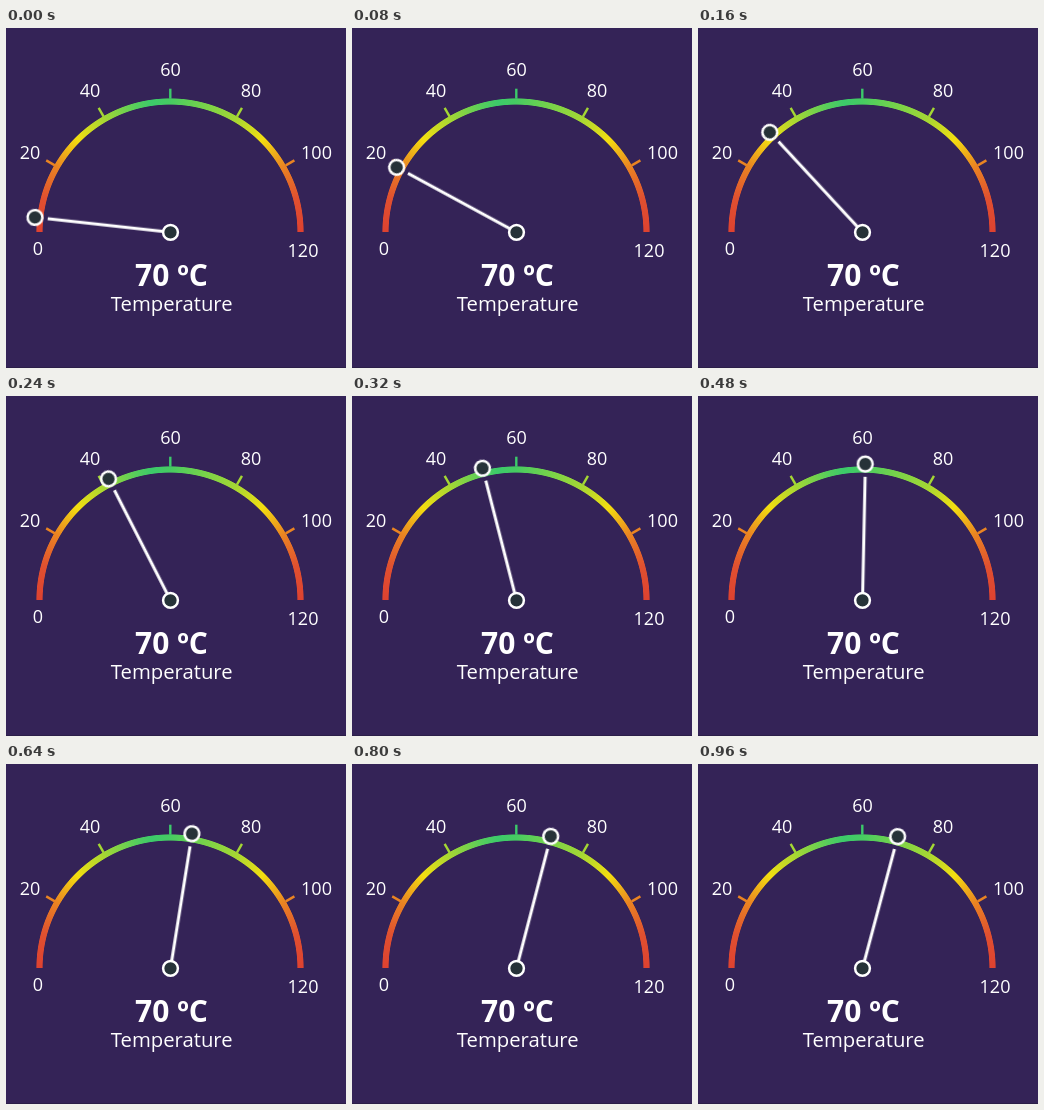
An HTML page for the animation above (8000 ms loop, 340 px wide and 340 px high).

```html
<!DOCTYPE html>
<html lang="en">
<head>
<meta charset="utf-8">
<title>Temperature gauge</title>
<style>
html, body { margin: 0; width: 100%; height: 100%; overflow: hidden; background: #342357; }
.gauge { position: absolute; left: 0; top: 0; width: 340px; height: 340px; overflow: hidden; }
.arc {
  position: absolute; left: 24px; top: 64px; width: 280px; height: 140px;
  --ring: radial-gradient(circle at 140px 140px, transparent 127px, #000 127.8px 133.2px, transparent 134px);
  background: conic-gradient(from 270deg at 140px 140px,
    #de4230 0deg, #e05030 15deg, #ea8422 30deg, #f3de10 45deg, #a4d734 60deg,
    #55cd5c 75deg, #3cca6a 82deg, #46cb62 90deg, #76d34a 105deg, #a4d734 120deg,
    #f3de10 135deg, #ea8422 150deg, #e05030 165deg, #de4230 180deg, #de4230 360deg);
  -webkit-mask: var(--ring);
  mask: var(--ring);
}
svg { position: absolute; left: 0; top: 0; }
text { font-family: "Open Sans", "Noto Sans", sans-serif; fill: #fff; text-anchor: middle; }
.labels { font-size: 18px; font-weight: 450; }
.ticks { stroke-width: 2.4; }
.knob { fill: #263238; stroke: #fff; stroke-width: 2.5; }
.needle {
  transform-origin: 164.5px 204.3px;
  animation: swing 8s step-end infinite;
}
/* Decelerating swing, one step every 80 ms */
@keyframes swing {
  0% { transform: rotate(6.3deg); }
  1% { transform: rotate(28.5deg); }
  2% { transform: rotate(47.2deg); }
  3% { transform: rotate(63deg); }
  4% { transform: rotate(75.6deg); }
  5% { transform: rotate(84.5deg); }
  6% { transform: rotate(91.2deg); }
  7% { transform: rotate(95.7deg); }
  8% { transform: rotate(99.1deg); }
  9% { transform: rotate(102.7deg); }
  10% { transform: rotate(104.6deg); }
  11% { transform: rotate(104.8deg); }
  12%, 100% { transform: rotate(105deg); }
}
</style>
</head>
<body>
<div class="gauge">
  <div class="arc"></div>
  <svg width="340" height="340" viewBox="0 0 340 340">
    <rect y="339" width="340" height="1" fill="#2b1e48"/>
    <g class="ticks">
      <path d="M31 204h-10" stroke="#ea8422" transform="rotate(30 164.3 204)"/>
      <path d="M31 204h-10" stroke="#a4d734" transform="rotate(60 164.3 204)"/>
      <path d="M31 204h-10" stroke="#3cca6a" transform="rotate(90 164.3 204)"/>
      <path d="M31 204h-10" stroke="#a4d734" transform="rotate(120 164.3 204)"/>
      <path d="M31 204h-10" stroke="#ea8422" transform="rotate(150 164.3 204)"/>
    </g>
    <g class="labels">
      <text x="32" y="227">0</text>
      <text x="24" y="131">20</text>
      <text x="84" y="69">40</text>
      <text x="164.5" y="48">60</text>
      <text x="245" y="69">80</text>
      <text x="310.5" y="131">100</text>
      <text x="297" y="229">120</text>
    </g>
    <text x="165.5" y="258" font-size="30" font-weight="700">70 ºC</text>
    <text x="165.7" y="283" font-size="20.3" font-weight="450">Temperature</text>
    <g class="needle">
      <path d="M164.5 204.3H41" stroke="#fff" stroke-width="3"/>
      <circle class="knob" cx="28.2" cy="204.3" r="7.4"/>
    </g>
    <circle class="knob" cx="164.5" cy="204.3" r="7.4"/>
  </svg>
</div>
</body>
</html>
```
